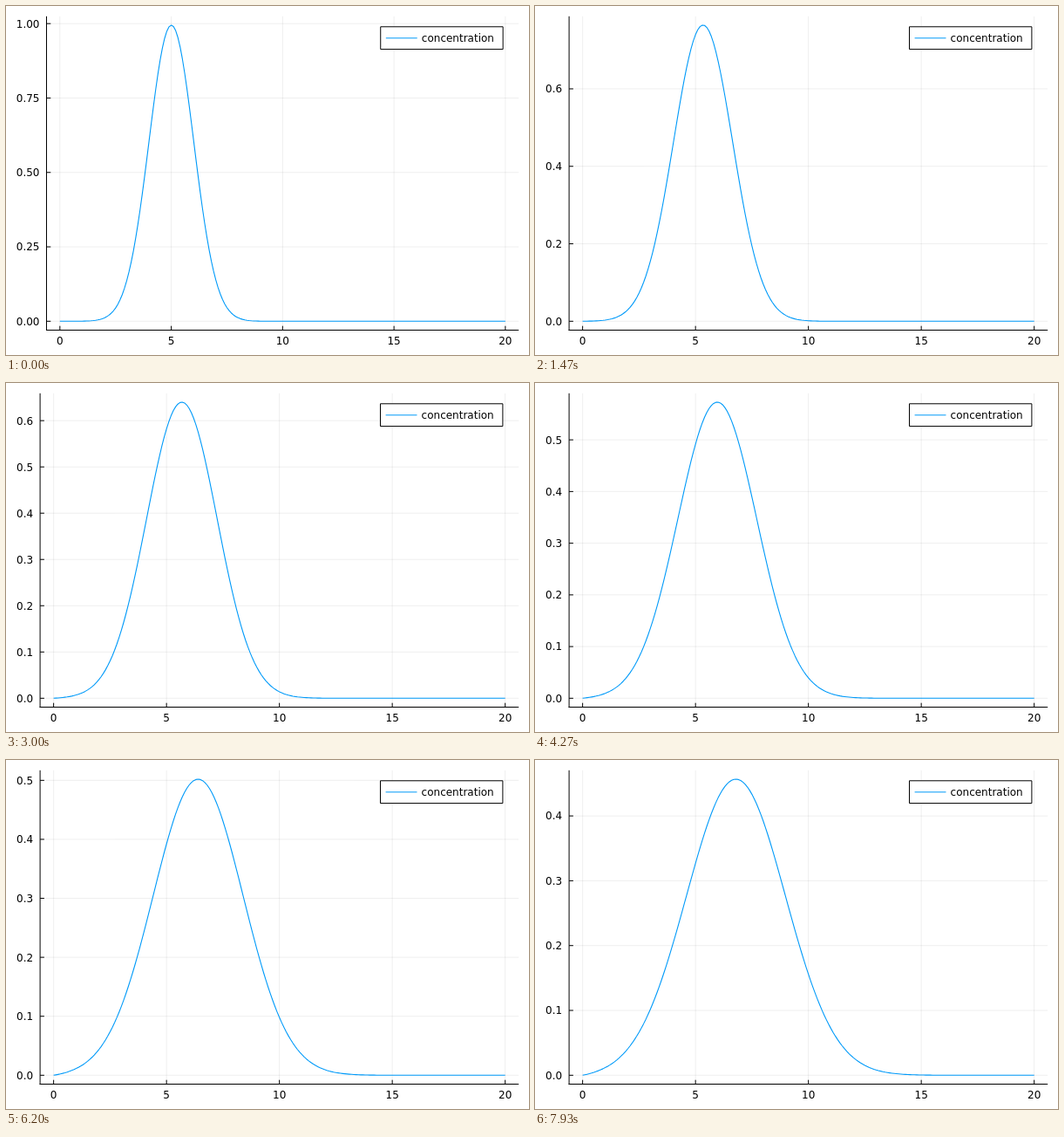
An HTML page with a canvas that plays this animation: 600 px wide and 400 px high, repeating every 8 s.

```html
<!DOCTYPE html>
<html lang="en">
<head>
<meta charset="utf-8">
<title>Concentration</title>
<style>
  html, body { margin: 0; width: 100%; height: 100%; overflow: hidden; background: #fff; }
  canvas { display: block; width: 600px; height: 400px; }
</style>
</head>
<body>
<canvas id="stage" width="600" height="400"></canvas>
<script>
const ctx = document.getElementById("stage").getContext("2d");

const LOOP = 8000, FPS = 15, STEPS_PER_FRAME = 3;
const DT = 0.005, SPEED = 1, DIFFUSION = 1.06;
const LENGTH = 20, POINTS = 201, START = 5;
const TOP = 11.8, BOTTOM = 371.5, RIGHT = 588.2;
const MARGIN = 0.03 / 1.06;
const BLUE = "#009af9", GRID = "rgba(0,0,0,0.065)";

// Drifting, spreading pulse; a mirrored pulse holds the value at x = 0 to zero.
function concentration(x, t) {
  const variance = 1 + 2 * DIFFUSION * t;
  const bell = d => Math.exp(-d * d / (2 * variance)) / Math.sqrt(variance);
  const a = SPEED / DIFFUSION;
  const mirror = Math.exp(-(10 * a - a * a) / 2);
  const drift = SPEED * t;
  return bell(x - START - drift) - mirror * bell(x + START - a - drift);
}

function line(x1, y1, x2, y2, color, width = 1) {
  ctx.strokeStyle = color;
  ctx.lineWidth = width;
  ctx.beginPath();
  ctx.moveTo(x1, y1);
  ctx.lineTo(x2, y2);
  ctx.stroke();
}

function label(text, x, y, align) {
  ctx.fillStyle = "#000";
  ctx.textAlign = align;
  ctx.fillText(text, x, y);
}

function drawLegend(left) {
  const x = RIGHT - (RIGHT - left) / 30 - 140.4;
  const y = TOP + (BOTTOM - TOP) / 30;
  ctx.fillStyle = "#fff";
  ctx.fillRect(x, y, 140.4, 25.8);
  ctx.strokeStyle = "#000";
  ctx.lineWidth = 1;
  ctx.strokeRect(x, y, 140.4, 25.8);
  line(x + 6.1, 36.8, x + 42, 36.8, BLUE);
  label("concentration", x + 47.1, 41, "left");
}

function draw(frame) {
  const t = (frame * STEPS_PER_FRAME + 1) * DT;
  const xs = Array.from({ length: POINTS }, (_, i) => i * LENGTH / (POINTS - 1));
  const values = xs.map(x => concentration(x, t));
  const peak = Math.max(...values);
  const limit = peak * 1.03;

  const step = limit >= 1 ? 0.25 : limit >= 0.7 ? 0.2 : 0.1;
  const digits = step === 0.25 ? 2 : 1;
  const left = digits === 2 ? 46.5 : 39.1;
  const width = RIGHT - left, height = BOTTOM - TOP;
  const px = x => left + width * (MARGIN + (1 - 2 * MARGIN) * x / LENGTH);
  const py = v => BOTTOM - height * (MARGIN + (1 - 2 * MARGIN) * v / peak);

  const xTicks = [0, 5, 10, 15, 20];
  const yTicks = [];
  for (let i = 0; i * step <= limit; i++) yTicks.push(i * step);

  ctx.fillStyle = "#fff";
  ctx.fillRect(0, 0, 600, 400);
  ctx.font = '12px "DejaVu Sans", sans-serif';

  for (const x of xTicks) line(px(x), TOP, px(x), BOTTOM, GRID);
  for (const v of yTicks) line(left, py(v), RIGHT, py(v), GRID);

  line(left - 0.5, BOTTOM, RIGHT, BOTTOM, "#000");
  line(left, TOP, left, BOTTOM + 0.5, "#000");
  for (const x of xTicks) {
    line(px(x), BOTTOM, px(x), BOTTOM - 4.8, "#000");
    label(String(x), px(x), 387.5, "center");
  }
  for (const v of yTicks) {
    line(left, py(v), left + 4.8, py(v), "#000");
    label(v.toFixed(digits), left - 8, py(v) + 4.4, "right");
  }

  ctx.strokeStyle = BLUE;
  ctx.lineWidth = 1.1;
  ctx.lineJoin = "round";
  ctx.beginPath();
  xs.forEach((x, i) => ctx.lineTo(px(x), py(values[i])));
  ctx.stroke();

  drawLegend(left);
}

const began = performance.now();

function tick() {
  const ms = (performance.now() - began) % LOOP;
  // Frame starts fall on whole hundredths of a second.
  const clock = Math.floor(ms / 10) * 10 + 3.4;
  draw(Math.floor(clock * FPS / 1000) % (LOOP * FPS / 1000));
  requestAnimationFrame(tick);
}
tick();
</script>
</body>
</html>
```
